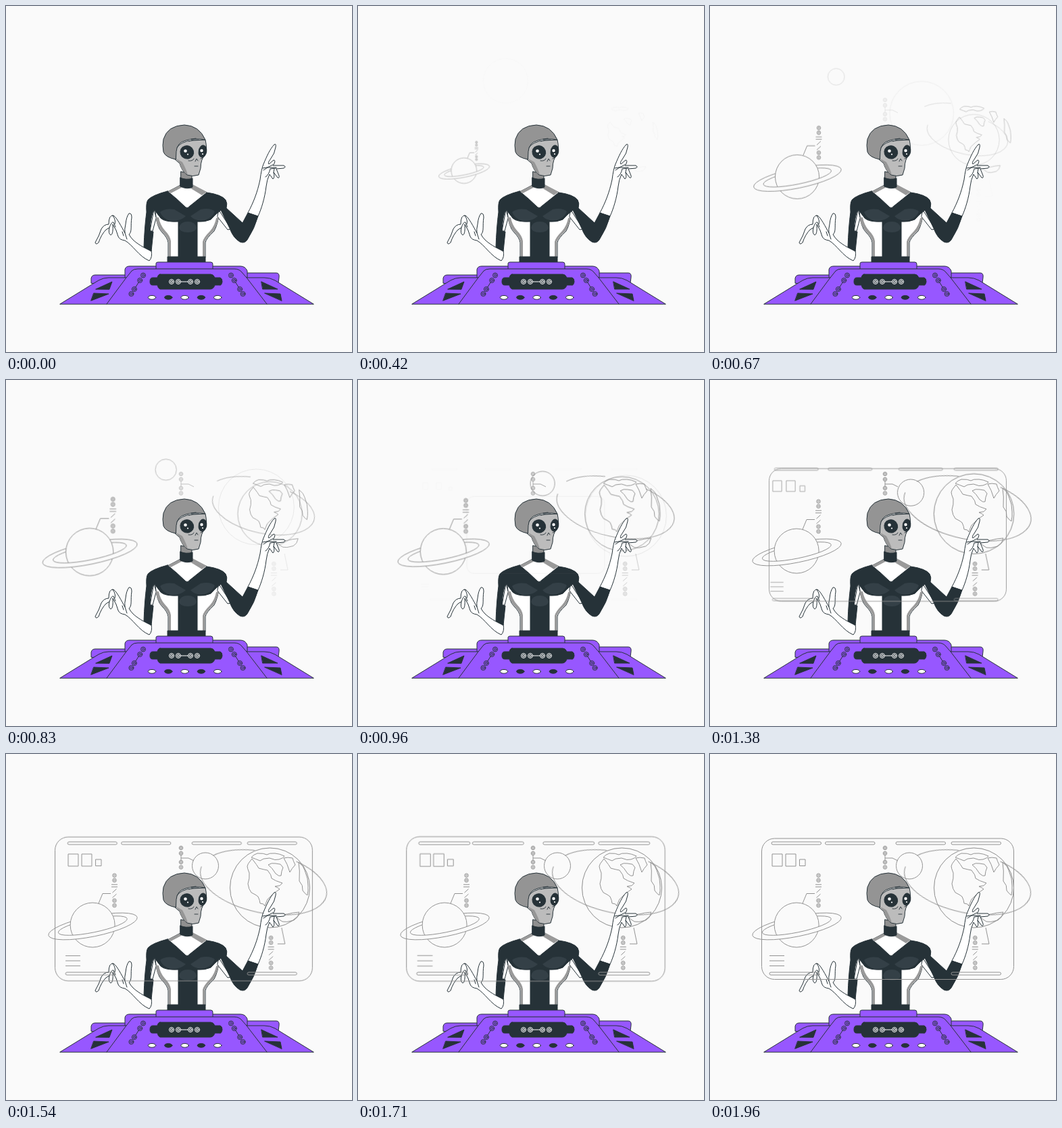
Write an HTML page that moves like this. It is 512 px wide and 512 px high and loops after 2040 ms.

```html
<!DOCTYPE html>
<html lang="en">
<head>
<meta charset="utf-8">
<title>Alien at a control desk</title>
<style>
  html, body { margin: 0; width: 100%; height: 100%; overflow: hidden; background: #fafafa; }
  svg { display: block; width: 100vw; height: 100vh; }
  .ink { stroke: #263238; stroke-linejoin: round; stroke-linecap: round; }
  .holo { fill: none; stroke: #929292; }
  .holo * { vector-effect: non-scaling-stroke; }
  .own { transform-box: fill-box; transform-origin: center; }
  #saturn { transform-origin: 195px 231px; }
  .bg { fill: #fafafa; }
  .dark { fill: #263238; }
  .white { fill: #fff; }
  .violet { fill: #9757ff; }
  .none { fill: none; }
  .plain { stroke: none; }
</style>
</head>
<body>
<svg viewBox="0 0 512 512">
  <g class="holo">
    <circle id="halo" cx="390.5" cy="198" r="59" stroke="#e6e6e6"/>
    <circle id="globe" class="own" cx="390.5" cy="198" r="59"/>
    <g id="land"></g>
    <g id="orbit" transform="translate(381 190) rotate(12)">
      <path class="own" d="M-81.4-23.2A95 45 0 0 1-22.7-43.7"/>
      <path class="own" d="M41-40.600A95 45 0 1 1-94.6-3.9"/>
    </g>
    <circle id="moon" cx="295" cy="165.5" r="19.5"/>
    <g id="saturn">
      <g transform="translate(128.5 255) rotate(-11.5)">
        <path d="M-67 0A67 15 0 0 1 67 0M-52-1A52 10 0 0 1 52-1"/>
        <circle class="bg" cx="0" cy="-2" r="33"/>
        <path class="bg plain" d="M-67 0A67 15 0 0 0 67 0L52-1A52 10 0 0 1-52-1Z"/>
        <path d="M-67 0A67 15 0 0 0 67 0M-52-1A52 10 0 0 0 52-1"/>
      </g>
      <path d="M137 221L143 206.500H155"/>
    </g>
  </g>

  <g class="ink">
    <!-- left forearm and hand -->
    <path class="white" d="M215 362C205 359 193 351 188 346Q184 342 182 338C187 334 184 325 186 313Q186 306 182 307Q178 312 177 323Q175 331 176 336C171 327 164 313 159 310Q152 309 152 323Q145 323 141 330Q138 340 132 350Q133 354 137 350Q141 338 148 331L153 328Q151 337 155 339Q159 338 158 323Q164 332 166 341Q168 346 176 347C187 353 197 371 212 377Q217 372 215 362Z"/>
    <path class="none" d="M153 328Q156 319 159 320L162 327M158 310Q163 317 161 323M176 336L179 345M172 334L174 340"/>
    <!-- right forearm and hand -->
    <path class="white" d="M358 306C366 291 372 276 376 257Q378 241 381 234C386 222 391 211 397 205Q400 203 399 209Q398 218 391 227Q387 232 389 234L396 228Q399 228 397 233L395 236L411 236Q415 238 411 240L400 241L404 251Q405 255 402 254L396 246Q398 254 395 256L390 249Q386 257 385 267C383 284 378 300 373 311Z"/>
    <path class="none" d="M380 240Q387 240 395 235M384 253Q389 250 391 241L400 240M396 246L397 241M381 243L387 239H400"/>

    <!-- torso -->
    <path class="white" d="M239 275L258 265H276L297 276L316 303Q314 322 308 333Q296 344 295 350V372H240V350Q239 343 231 335Q223 328 221 304Z"/>
    <path class="white" d="M219 301L213 333H217L222 314ZM315 302L333 330L328 331L313 312Z"/>
    <path class="plain" fill="#9a9a9a" d="M276 264L297 275L290 280L272 269ZM258 265L240 274L244 277L261 268ZM221 312Q223 326 232 335Q240 343 241 350V371H244V348Q243 340 235 332Q228 324 226 313ZM315 312Q313 324 307 333Q295 344 294 350V371H291V349Q292 343 302 333Q309 325 311 314Z"/>
    <path class="dark" d="M239 274Q254 286 266 298Q269 300 272 296L297 276Q319 279 325 287Q328 292 326 299L350 321L358 306L373 311Q368 329 357 346Q353 352 346 349Q336 343 331 329L318 302Q309 309 303 316Q294 320 283 319V371H295V379H239V371H255V319Q235 320 229 314L219 301Q214 311 213 333L218 334L215 363L204 357Q205 327 208 305Q207 291 210 287Q216 280 239 274Z"/>
    <g class="plain" fill="#344047">
      <path d="M228 305Q235 299 249 301L266 311Q258 319 243 318Q231 314 228 305Z"/>
      <path d="M309 304Q302 298 288 301L273 311Q280 319 294 317Q306 313 309 304Z"/>
      <path d="M256 328Q258 319 269 319Q280 319 282 328Q281 335 269 335Q257 335 256 328Z"/>
    </g>

    <!-- head -->
    <path fill="#8f8f8f" d="M259 245L275 249V257H259Z"/>
    <path class="dark" d="M258 254Q266 258 276 255V268Q268 272 258 267Z"/>
    <path fill="#bcbcbc" d="M252 211Q258 200 276 199L295 198Q298 211 295 219Q288 227 288 240L285 250Q276 253 268 250Q260 244 257 233L249 226Z"/>
    <path class="plain" fill="#969696" d="M252 226L261 231Q267 242 269 250Q260 245 257 233Z"/>
    <path fill="#949494" d="M251 227Q236 224 233 216Q231 206 233 197Q239 177 264 176Q286 177 295 198Q279 195 266 199Q253 202 252 215Z"/>
    <path class="none" d="M271 200Q278 197 285 198M274 197L281 196M270 229Q276 230 278 226M280 230L282 226L284 229M279 237H284M288 226L292 224" stroke-width=".9"/>
    <ellipse class="dark" cx="268" cy="216.500" rx="10" ry="9.500" transform="rotate(28 268 216)"/>
    <ellipse class="dark" cx="291" cy="215" rx="5.800" ry="9" transform="rotate(10 291 215)"/>
    <g class="white plain">
      <circle cx="265.500" cy="214.500" r="2.300"/><circle cx="269" cy="219.500" r="1.100"/>
      <circle cx="289.500" cy="214" r="2.200"/><circle cx="291" cy="219" r="1.100"/>
    </g>

    <!-- desk -->
    <g class="violet">
      <path d="M126 410V403Q127 398 132 398H176L357 395H400Q405 395 404 402L403 410Z"/>
      <path d="M176 402V390Q177 385 183 385H347Q354 385 357 392V402Z"/>
      <path d="M222 389V381Q222 379 225 379H303Q306 379 306 382V389Z"/>
      <path d="M80 441L137 406Q144 402 152 402H178L186 392Q189 389 195 389H338Q345 389 349 394L356 402H382Q391 402 398 406L455 441Z"/>
    </g>
    <path class="none" d="M149 441L178 402M386 441L356 402"/>
    <path class="dark" d="M133 419L157 408L153 419ZM130 425L152 426L126 436ZM378 408L402 419H380ZM383 425L406 426L408 436Z"/>
    <path class="dark" d="M228 397H303Q307 397 309 402H317Q320 403 320 408Q319 414 316 413H309Q307 419 302 419H228Q225 418 224 413H217Q213 413 213 408Q213 402 217 402H224Q225 397 228 397Z"/>
    <g id="knobs" class="none"></g>
  </g>

  <g class="holo">
    <rect id="screen" class="own" x="76.500" y="125" width="373" height="208.500" rx="19"/>
    <g id="widgets"></g>
    <g id="headLabel"><path d="M259 150V157M259 154H270L278 158"/></g>
    <g id="globeLabel"><path d="M402 281H413L408 257"/></g>
  </g>
</svg>
<script>
const LOOP = 2040, RISE = 1000;
const $ = id => document.getElementById(id);
const add = (id, markup) => $(id).insertAdjacentHTML('beforeend', markup);

const circle = (x, y, r) => `<circle cx="${x}" cy="${y}" r="${r}"/>`;
const ring = (x, y, r = 2.8) => circle(x, y, r) + circle(x, y, r * .45);
const line = d => `<path d="${d}"/>`;
const own = d => `<path class="own" d="${d}"/>`;
const box = (x, y, w, h, r = 0) =>
  `<rect class="own" x="${x}" y="${y}" width="${w}" height="${h}" rx="${r}"/>`;

// Rings, two rules, two slashes and rings again
const label = (x, y) => [0, 7.2, 37.2, 44.4].map(d => ring(x, y + d)).join('') +
  line(`M${x - 4.5} ${y + 13.5}h9m-9 3.500h9M${x - 3} ${y + 25.5}l6-5.500m-6 13l6-5.500`);

add('saturn', label(160.500, 179.700));
add('globeLabel', label(392.300, 272));
for (const y of [139, 147, 160, 167.5]) add('headLabel', ring(259, y));

const bar = (x, y) => box(x, y, 73.5, 4, 2);
for (const x of [91, 170.5, 275, 357]) add('widgets', bar(x, 130));
for (const x of [88, 357]) add('widgets', bar(x, 323));
add('widgets', box(92, 148, 15, 18) + box(112, 148, 15, 18) + box(132.5, 156, 8.5, 9.5) +
  own('M88 298.500h22m-22 7.500h22m-22 7.500h22'));

// Seeded noise roughens the straight edges between a few coast points
let seed = 7;
const noise = size => {
  seed = seed * 16807 % 2147483647;
  return (seed / 2147483647 - .5) * size;
};
function coast(text) {
  const pts = text.split(' ').map(p => p.split(',').map(Number));
  const rough = pts.flatMap(([x, y], i) => {
    const [u, v] = pts[(i + 1) % pts.length];
    return [[x, y], [(x + u) / 2 + noise(4), (y + v) / 2 + noise(4)]];
  });
  return own(`M${rough.map(p => p.map(n => n.toFixed(1)).join(' ')).join('L')}Z`);
}
add('land', [
  '364,155 357,166 360,176 358,192 363,205 373,211 376,221 383,225 387,215 405,200 398,196 409,191 393,184 387,172 374,169', // north
  '363,153 372,147 386,149 398,147 412,151 404,156 390,154 376,158', // arctic
  '388,164 399,162 410,168 407,180 399,177', // bay islands
  '411,154 424,154 428,164 420,175', // ice cap
  '433,160 442,172 447,195 446,209 439,202 434,188', // east
  '399,240 416,237 434,234 426,246 409,248' // south
].map(coast).join(''));

// Desk knobs run along both sloping seams, mirrored about the middle
for (const side of [-1, 1]) {
  const at = y => 268 + side * (65 + (y - 398.5) * .64);
  for (const y of [398.5, 406, 419, 426]) add('knobs', ring(at(y), y, 3.5));
  add('knobs', line(`M${at(409)} 409L${at(416)} 416`));
}
add('knobs', `<g stroke="#fff">${[245, 255, 273, 283].map(x => ring(x, 408, 3.5)).join('')}${line('M259 408H269.500')}</g>`);
for (let i = 0; i < 5; i++)
  add('knobs', `<ellipse class="${i % 2 ? 'dark' : 'white'}" cx="${216 + i * 24.3}" cy="431.3" rx="5.7" ry="2.9"/>`);

// Each part fades in from its first pose, overshoots, then holds until the loop ends
function enter(el, delay, from = 'scale(.5)', to = 'scale(1)') {
  const hidden = { opacity: 0, transform: from };
  const shown = { opacity: 1, transform: to };
  el.animate([
    { ...hidden, offset: 0 },
    { ...hidden, offset: delay / LOOP, easing: 'cubic-bezier(.36, -.01, .5, 1.38)' },
    { ...shown, offset: (delay + RISE) / LOOP },
    { ...shown, offset: 1 }
  ], { duration: LOOP, iterations: Infinity });
}
const enterAll = (id, delay) => [...$(id).children].forEach(el => enter(el, delay));

enter($('saturn'), 5, 'scale(0)');
enter($('halo'), 240);
enterAll('land', 300);
enter($('globe'), 395);
enterAll('orbit', 395);
enter($('moon'), 400);
enter($('headLabel'), 430, 'none', 'none');
enter($('globeLabel'), 610, 'translate(5px, 0)', 'translate(0, 0)');
enter($('screen'), 800);
enterAll('widgets', 870);
</script>
</body>
</html>
```
